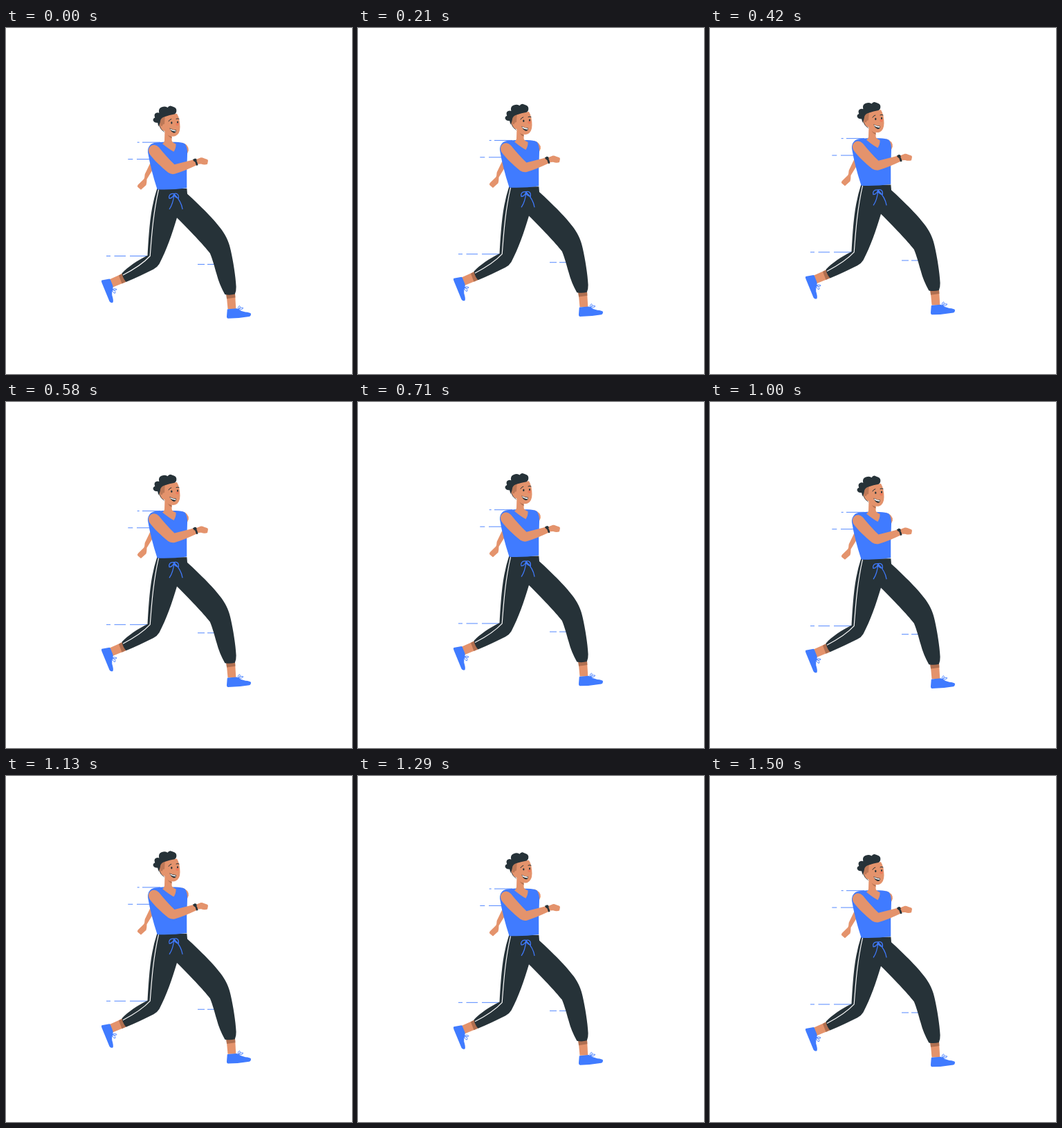
Write an HTML page that moves like this. It is 500 px wide and 500 px high and loops after 1.54 s.

```html
<!DOCTYPE html>
<html lang="en">
<head>
<meta charset="utf-8">
<title>Runner</title>
<style>
  html, body { margin: 0; width: 100%; height: 100%; overflow: hidden; background: #fff; }
  svg { display: block; width: 100vw; height: 100vh; }
  .blue { fill: #407bff; }
  .dark { fill: #263238; }
  .skin { fill: #e4936c; }
  .shade { fill: #b06f50; }
  .line { fill: none; stroke: #407bff; stroke-linecap: round; stroke-linejoin: round; }
  .ink { fill: none; stroke: #263238; stroke-linecap: round; }
  .flat { stroke-linecap: butt; }
</style>
</head>
<body>
<svg viewBox="0 0 500 500">
  <g id="runner">
    <!-- speed lines -->
    <path class="line flat" stroke-width=".9" d="M189.700 165.200h3M197 165.200h26M176.300 189.600h7M189 189.600h21M145 329.500h6M156.500 329.500h16.500M179 329.500h27M277 341.500h10M291 341.500h10"/>

    <!-- far arm -->
    <path class="skin" d="M209.500 193L200.800 211C200 214 200.800 217 198.500 219L190.800 226.500Q189 228.500 190.500 230L195 233.700L202.500 227Q203.500 224 203.500 218.500L213 203Z"/>

    <!-- back foot -->
    <path class="skin" d="M149 363.500L167 355.500L173 367L153.500 375Z"/>
    <path class="shade" d="M163 357.500L168.500 354.500L174 366.500L167.500 369.500Z"/>
    <path class="blue" d="M138.500 364.500L149.500 362.500Q150.500 362.500 151 364L154.200 372Q155.300 374 154.200 377.500Q152.700 382 153.200 386Q155.700 394 154.500 396.500Q151.500 398 149.500 395L138.300 367.800Q137.300 365 138.500 364.500Z"/>
    <path class="line" stroke-width=".9" d="M153.500 377.500Q157 375.500 160 377.500Q159 380.500 153.500 377.500Q154 383 157.500 383.300Q159.500 380.500 153.500 377.500"/>

    <!-- front foot -->
    <path class="skin" d="M318.500 384H331L332.300 406H320.500Z"/>
    <path class="shade" d="M318 384H331L331.400 389.500L319 391.300Z"/>
    <path class="blue" d="M320.500 406.300L333.500 405.200Q340 409.500 346 410.500Q353 411 354 413Q354 416.500 351.500 417Q336 419.700 321 419.800Q318.700 419.500 319 416.500L319.700 407.300Q319.800 406.400 320.500 406.300Z"/>
    <path class="line" stroke-width=".9" d="M335.500 407Q334.500 402.500 337.500 401.500Q340 402.500 335.500 407Q339.500 402.800 342.700 404.500Q342 407.500 335.500 407"/>

    <!-- trousers -->
    <path class="dark" d="M218 232H261.300V231L262 239.800C281 257 302 278 312 292C319 302 322.300 310 324.700 321C328.500 338 331.700 358 332.600 374Q332.800 380 330.800 384.500Q324 386.500 316.300 385Q308 370 304.500 356C301 344 298.700 335 294.800 325.500C285 313 265 292 247 274.300C240 298 232 321 221.500 341Q218.500 346 213 348.700C200 355 187 361.500 173.500 367Q169 362 167.500 354.500C176 345 190 336 204.500 328.700C205.600 311 207 282 211.200 260Q214 245 218 233Z"/>
    <path fill="none" stroke="#fff" stroke-width="1.150" stroke-linejoin="round" d="M220.500 233.500C212.600 268 210.400 301 208.200 329.500C198.500 340 184.500 349 169 357"/>

    <!-- vest -->
    <path class="skin" d="M254 165.500Q264.800 169 263.800 177L261.800 182Z"/>
    <path class="blue" d="M227 164.700C218 165.200 212 165.400 208.500 169Q204.500 173 205 179.500Q209 204 218.600 233.300Q240 234.200 261.300 231.200Q260.800 207 262 182Q262.500 173 258.700 167.600Q254 164.800 245 164.800Z"/>
    <path class="line" stroke-width="1.250" d="M243 239.500C236 238.500 235 243.500 236 246.300C240 246 242 243 243 239.500C246.500 238.500 250 240 249.300 246C245 245.500 243 243 243 239.500M243 240Q241.500 254 236.300 261.500M243 240C249 246 253.500 252 255 261.500"/>

    <!-- neck and head -->
    <path class="skin" d="M229.500 147L229 163Q228 166.500 226 167.300Q236 175.500 242.500 178.800Q246 173 245.500 167.500Q240 165.500 239.600 162.800L239.500 150Z"/>
    <path class="shade" d="M233.500 154Q236 156.800 239.500 157V159.600Q235.500 158 233.500 154Z"/>
    <path class="skin" d="M223 131Q229 124.500 247 123.800Q251.400 131 251.500 143Q251.500 153.500 244.500 156.300Q237 158 231 151.500L229.500 149Q224 148.500 221 140Z"/>
    <path class="shade" d="M222.500 129L229.800 126.500L229 139Q227 138 225.500 142L222.500 141Z" opacity=".75"/>
    <path class="dark" d="M221 142.500Q219.300 139.500 219.200 137Q213.800 137 212.600 133.500Q212.300 130.500 215.300 129.500Q213.300 124.500 216.500 123Q219 121.500 221.300 122.800Q219.800 116.500 224.500 114.600Q230.500 112.200 233.500 115Q236 111 240 113.300Q246 114.800 246.300 118.500Q246.700 122.800 243.500 124.600Q236 126 230 128Q225 129 223.300 133Q222.800 137 221 142.500Z"/>
    <path class="ink" stroke-width=".8" d="M221.800 141.500Q223.500 147 228.300 150"/>
    <ellipse cx="247.500" cy="139" rx="2.200" ry="2.200" fill="#f36f55" opacity=".65"/>
    <ellipse class="dark" cx="239.300" cy="137" rx="1.100" ry="1.700"/>
    <ellipse class="dark" cx="248" cy="136" rx="1" ry="1.600"/>
    <path class="ink" stroke-width="1" d="M235 134.800Q236.500 132 238.800 131.600M246 131.300Q248 130.300 250 131.300"/>
    <path class="dark" d="M236.300 144.600Q241 147.500 246 147.300Q245.800 151.800 242.300 151.500Q238.300 150.500 236.300 144.600Z"/>
    <path fill="#fff" d="M237 145.400Q241 147.800 245.500 147.900L245 149.600Q240.500 149.300 237.800 147.300Z"/>

    <!-- near arm -->
    <path class="skin" d="M206.500 174Q209 168.800 214.500 169Q217.800 169.300 221 172.500C228 181 235.500 190 243.500 197.300L273 189.800L276 198C265 203 254 208 244 210.800Q239 212 234.500 209C224 200.500 214 191 207.800 182.500Q205 178 206.500 174Z"/>
    <path class="skin" d="M274 190.300L281.500 187.300Q284 187 286 188.200L291 190Q292.500 191 291.800 193L291 196.700Q287 198.200 282 196.500L276.500 196.700Z"/>
    <path class="ink flat" stroke-width="2.600" d="M271.800 189.300Q275 192.500 276.300 198.500"/>
    <path class="dark" d="M269.800 190L274.500 188.500L276 191.300L272 193.200Z"/>
  </g>
</svg>
<script>
  const runner = document.getElementById('runner');
  const LOOP = 1540, STEPS = 37, TOP = 712, END = 1500;
  const RISE = -9.5, REST = 0.5;

  // Linear rise and fall of the whole figure.
  function bob(t) {
    if (t < TOP) return RISE * t / TOP;
    return RISE + (REST - RISE) * (t - TOP) / (END - TOP);
  }

  function draw(now) {
    const step = LOOP / STEPS;
    const n = Math.min(STEPS - 1, Math.floor((now % LOOP) / step + 0.15));
    runner.setAttribute('transform', `translate(0 ${bob(n * step).toFixed(3)})`);
  }

  const start = performance.now();
  function tick() {
    draw(performance.now() - start);
    requestAnimationFrame(tick);
  }
  tick();
</script>
</body>
</html>
```
